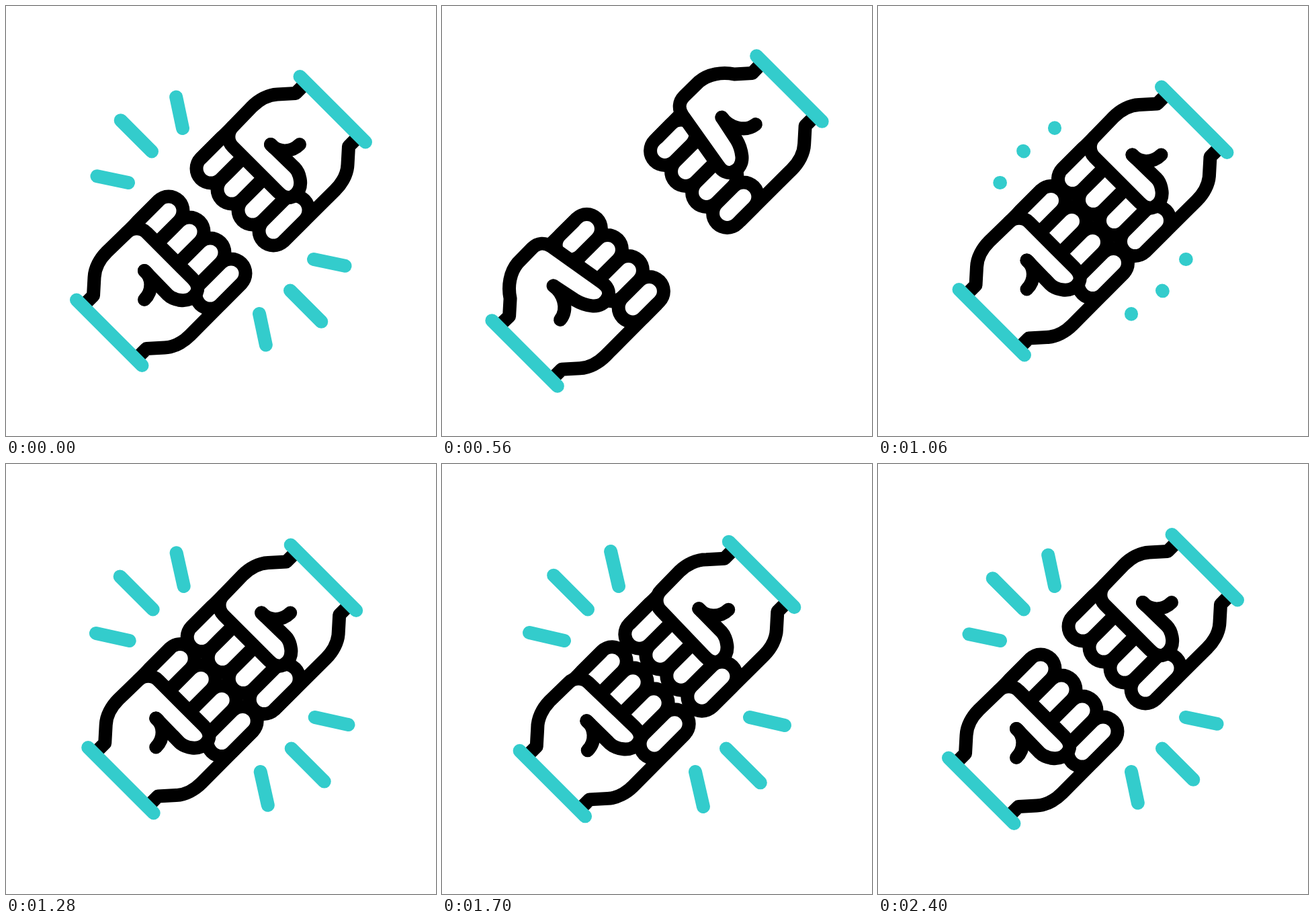
An HTML page that plays this animation: 640x640 px, repeating every 2.62 s.

```html
<!DOCTYPE html>
<html lang="en">
<head>
<meta charset="utf-8">
<title>Fist bump</title>
<style>
  html, body { margin: 0; height: 100%; overflow: hidden; background: #fff; }
  svg { display: block; width: 100%; height: 100%; }
  path { fill: none; stroke: #000; stroke-width: 20; stroke-linecap: round; stroke-linejoin: round; }
  .tips { stroke-width: 63; }
  .nails { stroke: #fff; stroke-width: 23; }
  .palm { fill: #fff; }
  .cuff, .ray { stroke: #33cccc; }
</style>
</head>
<body>
<svg viewBox="0 0 640 640"></svg>
<script>
const LOOP = 2620;
const svg = document.querySelector('svg');

// [time, value] pairs, eased between neighbours
const SHIFT = [[200, 0], [690, 37], [740, 37], [1058, -15.5], [1590, -15.5], [1950, 6], [2370, 0]];
const POSE = [[200, 0], [740, 1], [920, 1], [1060, 0], [1590, 0], [1950, .45], [2400, 0]];
const RAY = [[200, 46.5], [480, 0], [1040, 0], [1353, 57.5], [1590, 57.5], [1950, 33], [2400, 46.5]];
const SHAKE = [[1058, 0], [1160, -1.7], [1280, 1.7], [1400, -1.7], [1500, 0]];

const fingers = (x1, y1, x2, y2) => [0, 31, 62, 93]
  .map(d => `M${x1 + d} ${y1 + d}L${x2 + d} ${y2 + d}`).join('');
const closed = fingers(305, 242, 336, 211);
const loose = fingers(299.5, 247.5, 321.5, 225.5);

// class, clenched pose, relaxed pose
const PARTS = [
  ['tips', closed, loose],
  ['nails', closed, loose],
  ['side', 'M290 227L337 180', 'M290 227L328 188'],
  ['edge', 'M524 195L510 209L508.5 236C508 250 500 264 490 274L413.3 350.2'],
  ['palm',
    'M445 116L431 130L404 131.5C390 132 376 140 366 150L337.5 179.5C329.3 187.7 329.3 201.3 337.5 209.5' +
    'L405 277C412 284 419 287 426 284C436 279 439 269 438 260C437 252 434 245 430 241L394 206',
    'M445 116L431 131L405 132.5C385 127 362 129 347 141L327 160C319 168 318 178 324 188' +
    'L372 265C378 275 386 278 393 276C404 272 409 262 408 252C407 243 405 235 400 226L383 193'],
  ['hook', 'M394 206C404 218 424 219 437 206', 'M383 193C393 208 418 220 436 207'],
  ['cuff', 'M437.5 105L535 202.5']
];

function add(tag, parent, cls = '') {
  const el = document.createElementNS('http://www.w3.org/2000/svg', tag);
  if (cls) el.setAttribute('class', cls);
  return parent.appendChild(el);
}

function at(keys, t) {
  const i = keys.findIndex(k => k[0] > t);
  if (i < 0) return keys[keys.length - 1][1];
  if (i === 0) return keys[0][1];
  const [t0, a] = keys[i - 1], [t1, b] = keys[i];
  const p = (t - t0) / (t1 - t0);
  return a + (b - a) * p * p * (3 - 2 * p);
}

function mix(a, b, q) {
  const nums = b.match(/[\d.]+/g);
  let i = 0;
  return a.replace(/[\d.]+/g, n => (+n + (nums[i++] - n) * q).toFixed(2));
}

const scene = add('g', svg);
const rays = add('path', scene, 'ray');
const hands = ['', 'matrix(0 1 1 0 0 0) '].map(flip => {
  const g = add('g', scene);
  return { g, flip, paths: PARTS.map(([cls]) => add('path', g, cls)) };
});

function rayPath(len) {
  if (len < .5) return '';
  const dx = Math.max(0, len - 21) * .385;
  const mid = len * (1.14 - .0031 * len);
  const lines = [
    [263, 182, 263 - dx, 182 - len],
    [182, 263, 182 - len, 263 - dx],
    [217, 216.5, 217 - mid, 216.5 - mid]
  ];
  return lines.map(l => [l, l.map(v => 640 - v)]).flat()
    .map(([x1, y1, x2, y2]) => `M${x1} ${y1}L${x2} ${y2}`).join('');
}

function draw(t) {
  const s = at(SHIFT, t), q = at(POSE, t);
  const shapes = PARTS.map(([, a, b]) => b ? mix(a, b, q) : a);
  for (const { g, flip, paths } of hands) {
    g.setAttribute('transform', `${flip}translate(${s} ${-s})`);
    paths.forEach((p, i) => p.setAttribute('d', shapes[i]));
  }
  rays.setAttribute('d', rayPath(at(RAY, t)));
  scene.setAttribute('transform', `translate(${at(SHAKE, t)} 0)`);
}

const start = performance.now();
function tick() {
  draw((performance.now() - start) % LOOP);
  requestAnimationFrame(tick);
}
tick();
</script>
</body>
</html>
```
